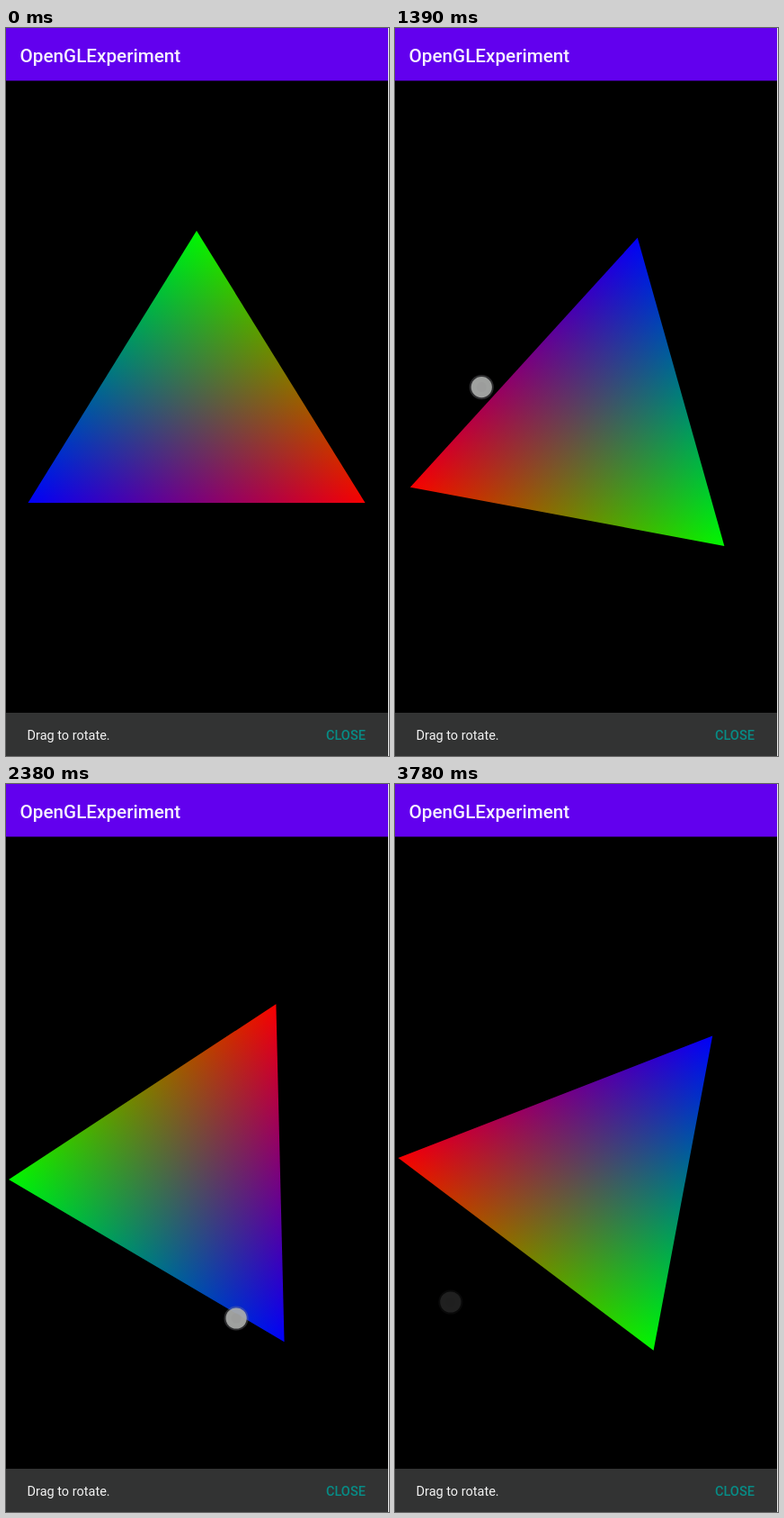
Recreate the animation shown at these times as an HTML page. Size 426 by 808 pixels, loop 3830 ms.

```html
<!DOCTYPE html>
<html lang="en">
<head>
<meta charset="utf-8">
<title>OpenGLExperiment</title>
<style>
  html, body { margin: 0; width: 100%; height: 100%; overflow: hidden; background: #000; }
  svg { display: block; width: 426px; height: 808px; }
  text { font-family: Roboto, sans-serif; }
  #mesh { isolation: isolate; }
  #mesh path { mix-blend-mode: plus-lighter; }
</style>
</head>
<body>
<svg viewBox="0 0 426 808">
  <defs id="defs"></defs>
  <rect width="426" height="808" fill="#000"/>
  <g id="mesh"></g>
  <g id="touch">
    <circle r="13.6" fill="#808088" fill-opacity=".35"/>
    <circle r="11.6" fill="#acaeac" fill-opacity=".9"/>
    <circle r="5.5" fill="#9a9a9a" fill-opacity=".45"/>
  </g>
  <rect width="426" height="58.5" fill="#6200ee"/>
  <text x="15.5" y="37.5" font-size="20.7" font-weight="500" fill="#f6f0ff">OpenGLExperiment</text>
  <rect y="760" width="426" height="48" fill="#323333"/>
  <text x="23.5" y="790" font-size="14.5" fill="#f2f2f2">Drag to rotate.</text>
  <text x="356" y="790" font-size="14.5" font-weight="500" fill="#078c86">CLOSE</text>
  <rect x="425" width="1" height="808" fill="#f0f0f0"/>
</svg>
<script>
const LOOP = 3830;
const CENTER = { x: 212, y: 434 };
const NS = "http://www.w3.org/2000/svg";
const byId = id => document.getElementById(id);

function add(parent, tag, attrs) {
  const node = document.createElementNS(NS, tag);
  for (const key in attrs) node.setAttribute(key, attrs[key]);
  return parent.appendChild(node);
}

// Each corner's colour fades to black at the opposite edge; the three layers add up.
const corners = [
  { x: 0, y: -209, color: "#00f800" },
  { x: -187.5, y: 93, color: "#0000f8" },
  { x: 187.5, y: 93, color: "#f80000" }
];
const outline = "M" + corners.map(c => c.x + " " + c.y).join("L") + "Z";
corners.forEach((c, i) => {
  const a = corners[(i + 1) % 3], b = corners[(i + 2) % 3];
  const ex = b.x - a.x, ey = b.y - a.y;
  const k = ((c.x - a.x) * ex + (c.y - a.y) * ey) / (ex * ex + ey * ey);
  const fade = add(byId("defs"), "linearGradient", {
    id: "fade" + i, gradientUnits: "userSpaceOnUse",
    x1: c.x, y1: c.y, x2: a.x + k * ex, y2: a.y + k * ey
  });
  add(fade, "stop", { offset: 0, "stop-color": c.color });
  add(fade, "stop", { offset: 1, "stop-color": "#000" });
  add(byId("mesh"), "path", { d: outline, fill: `url(#fade${i})` });
});

// time, clockwise turn in degrees
const spin = [
  [100, 0], [640, 121.5], [1390, 492.4], [1820, 617.1],
  [2380, 988.6], [3310, 1619.3], [3780, 1958.8]
];
// time, direction from the centre in degrees, distance
const drag = [
  [100, -63, 173], [640, 0, 132], [1020, 90, 178], [1390, 197, 121],
  [1820, 257.5, 179], [2080, 345, 150], [2380, 434.5, 165],
  [2840, 610, 145], [3310, 774.7, 214], [3550, 818, 235], [3780, 856.8, 206]
];
// start time, number of equal screen updates until the next start
const updates = [
  [0, 1], [100, 12], [640, 1], [690, 10], [1170, 5], [1390, 1], [1440, 6],
  [1720, 2], [1820, 1], [1870, 9], [2280, 2], [2380, 1], [2410, 9],
  [2840, 10], [3310, 1], [3360, 1], [3390, 8], [3780, 1], [LOOP, 1]
];

function segment(keys, t) {
  let i = 0;
  while (i < keys.length - 2 && t >= keys[i + 1][0]) i++;
  return i;
}

// Monotone cubic interpolation of one column.
function sample(keys, t, col) {
  const last = keys.length - 1;
  t = Math.min(Math.max(t, keys[0][0]), keys[last][0]);
  const rate = i => (keys[i + 1][col] - keys[i][col]) / (keys[i + 1][0] - keys[i][0]);
  const slope = i => {
    if (i === 0) return rate(0) * 0.6;
    if (i === last) return rate(last - 1);
    const p = rate(i - 1), q = rate(i);
    return p * q <= 0 ? 0 : 2 * p * q / (p + q);
  };
  const i = segment(keys, t), span = keys[i + 1][0] - keys[i][0];
  const u = (t - keys[i][0]) / span, v = 1 - u;
  return keys[i][col] * v * v * (1 + 2 * u) + slope(i) * span * u * v * v
    + keys[i + 1][col] * u * u * (3 - 2 * u) - slope(i + 1) * span * u * u * v;
}

function hold(t) {
  const i = segment(updates, t), [start, count] = updates[i];
  const step = (updates[i + 1][0] - start) / count;
  return start + Math.floor((t - start) / step + 1e-6) * step;
}

function draw(time) {
  const t = hold(time % LOOP);
  byId("mesh").setAttribute("transform",
    `translate(${CENTER.x} ${CENTER.y}) rotate(${sample(spin, t, 1)})`);

  const angle = sample(drag, t, 1) * Math.PI / 180, dist = sample(drag, t, 2);
  const x = CENTER.x + dist * Math.cos(angle), y = CENTER.y + dist * Math.sin(angle);
  const alpha = t < 100 ? 0 : Math.min(1, Math.max(0, (3800 - t) / 100));
  byId("touch").setAttribute("transform", `translate(${x} ${y})`);
  byId("touch").setAttribute("opacity", alpha);
}

const begin = performance.now();
function tick() {
  draw(performance.now() - begin);
  requestAnimationFrame(tick);
}
tick();
</script>
</body>
</html>
```
